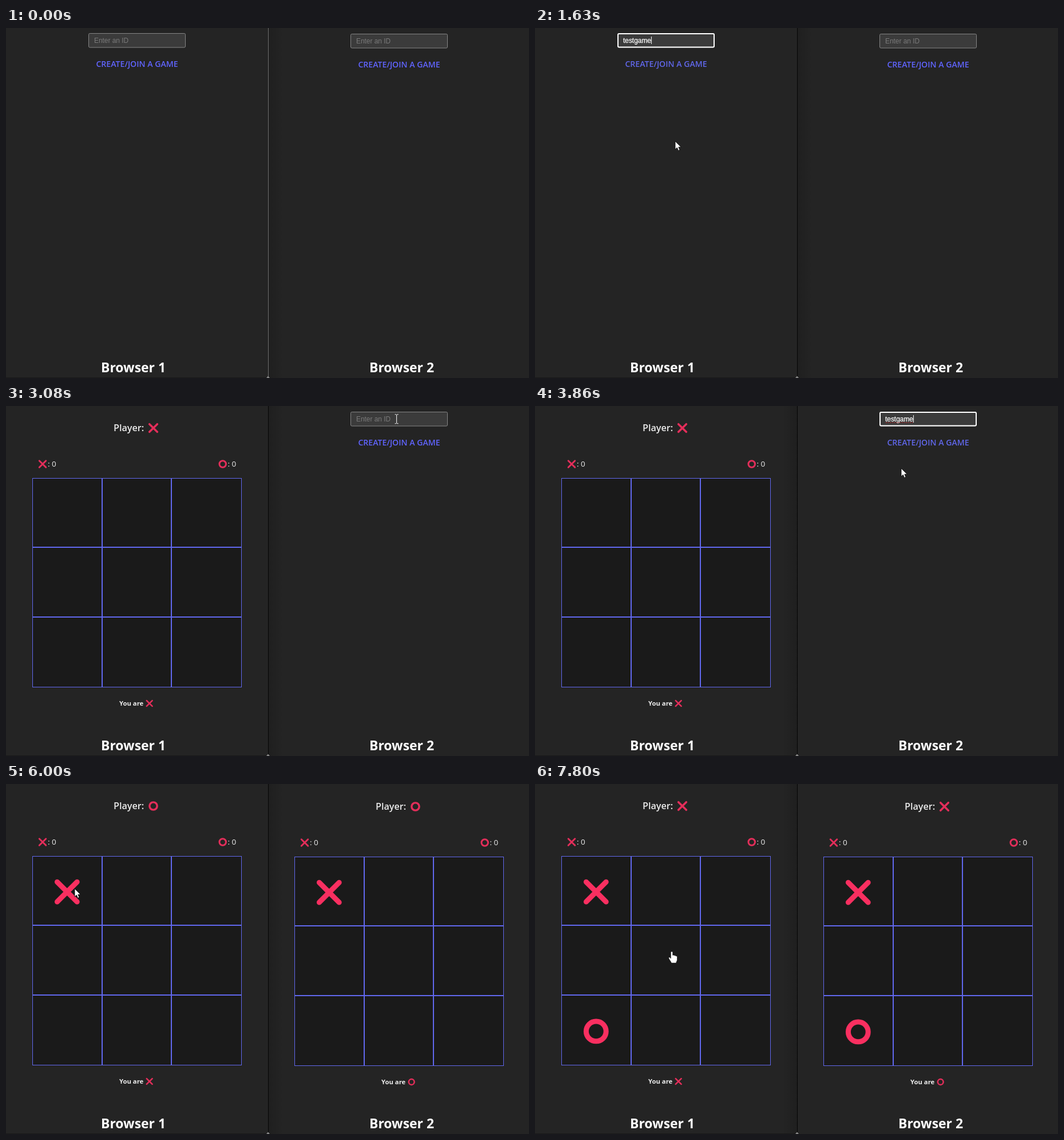
An HTML page for the animation above (8000 ms loop, 914x612 px).

```html
<!DOCTYPE html>
<html lang="en">
<head>
<meta charset="utf-8">
<title>Two browsers, one game</title>
<style>
  html, body { margin: 0; width: 100%; height: 100%; overflow: hidden; background: #242424; }
  svg { display: block; width: 914px; height: 612px; }
  text { font-family: "Open Sans", "Noto Sans", sans-serif; fill: #ececec; white-space: pre; }
  .field { font: 11.9px "Liberation Sans", Arial, sans-serif; fill: #7b7b7b; }
  .field.typed { fill: #fff; stroke: #fff; stroke-width: .25px; }
  .link { font-size: 14.1px; font-weight: 600; text-anchor: middle; }
  .player { font-size: 16.2px; font-weight: 600; }
  .score { font-size: 13.5px; }
  .you { font-size: 11.3px; font-weight: 700; }
  .title { font-size: 22.9px; font-weight: 700; text-anchor: middle; fill: #fff; }
  .small { color: #e32e5a; }
  .big { color: #f92f60; }
</style>
</head>
<body>
<svg id="stage" viewBox="0 0 914 612">
  <defs>
    <g id="X"><path d="M-17.4-17.4 17.4 17.4M17.4-17.4-17.4 17.4" fill="none" stroke="currentColor" stroke-width="9" stroke-linecap="round"/></g>
    <g id="O"><circle r="17.4" fill="none" stroke="currentColor" stroke-width="9"/></g>
    <linearGradient id="shade">
      <stop offset="0" stop-color="#000" stop-opacity=".14"/>
      <stop offset="1" stop-color="#000" stop-opacity="0"/>
    </linearGradient>
  </defs>
  <rect width="914" height="612" fill="#242424"/>
  <rect id="shadow" width="26" height="612" fill="url(#shade)"/>
  <path d="M0 611.5H456" stroke="#191919"/>
  <g id="panels"></g>
  <path id="divider" d="M458.5 0V612"/>
  <path d="M455 612 458 608.5 461 612Z" fill="#8a8a8a"/>
  <text class="title" x="222.5" y="602">Browser 1</text>
  <text class="title" x="691.5" y="602">Browser 2</text>
  <g id="pointer">
    <path id="arrow" d="M0 0V14.3L3.3 11.2 5.5 16.4 8 15.3 5.8 10.3H10.2Z" fill="#fff" stroke="#000" stroke-width=".8"/>
    <path id="hand" d="M-1.7 1.5C-1.7-.5 1.7-.5 1.7 1.5V6.5C2.5 5.6 4.2 5.8 4.5 7.1 5.4 6.3 6.9 6.7 7.1 8 8.1 7.4 9.5 8 9.5 9.5V14C9.5 16.5 8 17.5 7.7 20H-.6C-1.2 17.5-4.7 14-5.3 11.5-5.6 9.8-3.5 9.3-2.6 10.8L-1.7 12Z" fill="#fff" stroke="#000" stroke-width=".6"/>
    <path id="beam" d="M-3-8H-1L0-7 1-8H3M0-7V7M-3 8H-1L0 7 1 8H3" fill="none" stroke="#fff"/>
  </g>
</svg>
<script>
const LOOP = 8000, WORD = "testgame";
const $ = id => document.getElementById(id);
const show = (el, on) => el.setAttribute("visibility", on ? "inherit" : "hidden");

const sides = [
  { dx: 0, dy: 0, mark: "X", focus: 640, blur: 2380, hover: 2150, join: 2590,
    keys: [900, 1000, 1090, 1350, 1400, 1460, 1530, 1600], spell: false },
  { dx: 458, dy: 1, mark: "O", focus: 3230, blur: 4400, hover: 4250, join: 4540,
    keys: [...WORD].map((_, i) => 3300 + i * 70), spell: true }
];
const moves = [
  { at: 5650, mark: "X", col: 0, row: 0 },
  { at: 7040, mark: "O", col: 0, row: 2 }
];
// time, x, y of the pointer
const path = [
  [70, 805, 600], [560, 230, 22], [640, 230, 22], [820, 245, 198],
  [1700, 245, 198], [2110, 213, 73], [2180, 213, 71], [2590, 213, 71],
  [3120, 690, 22], [3230, 690, 22], [3440, 640, 109], [4000, 640, 109],
  [4280, 680, 66], [4540, 680, 66], [4890, 615, 130], [5030, 236, 262],
  [5450, 120, 183], [6050, 120, 183], [6360, 790, 400], [6500, 745, 432],
  [6640, 594, 430], [7100, 594, 430], [7700, 239, 293], [LOOP, 239, 293]
];

const mark = (kind, x, y, half, cls = "small") =>
  `<use href="#${kind}" class="${cls}" transform="translate(${x} ${y}) scale(${half / 22})"/>`;

function build(side) {
  const g = document.createElementNS("http://www.w3.org/2000/svg", "g");
  g.setAttribute("transform", `translate(${side.dx} ${side.dy})`);
  g.innerHTML = `
    <g class="lobby">
      <rect x="144.5" y="9.5" width="169" height="24.5" rx="2" fill="#3b3b3b" stroke="#858585"/>
      <rect class="ring" x="145" y="10" width="168" height="23.5" rx="2" fill="none" stroke="#fff" stroke-width="2"/>
      <text class="field" x="154" y="25.5"></text>
      <path class="caret" stroke="#fff"/>
      <path class="squiggle" d="M155 28H203" stroke="#d03030" stroke-dasharray="2 1.5"/>
      <text class="link" x="229" y="67.5">CREATE/JOIN A GAME</text>
    </g>
    <g class="game">
      <text class="player" x="188" y="44">Player:</text>
      <g class="turnX">${mark("X", 257.5, 38.5, 8.6)}</g>
      <g class="turnO">${mark("O", 257.5, 38.5, 8.4)}</g>
      ${mark("X", 64, 101.5, 7.3)}<text class="score" x="73" y="106">: 0</text>
      ${mark("O", 378.7, 101.5, 7.3)}<text class="score" x="387.5" y="106">: 0</text>
      <rect x="46.5" y="126.5" width="365" height="365" fill="#1a1a1a" stroke="#6168ee"/>
      <path d="M168 126V492M289 126V492M46 247H412M46 369H412" stroke="#6168ee" stroke-width="2"/>
      ${moves.map(m => `<g class="move">${mark(m.mark, 106.8 + m.col * 121.8, 188.6 + m.row * 121.9, 22, "big")}</g>`).join("")}
      <text class="you" x="198" y="524">You are</text>
      ${mark(side.mark, 250.7, 520, 6.2)}
    </g>`;
  $("panels").append(g);
  for (const name of ["lobby", "game", "ring", "field", "caret", "squiggle", "link", "turnX", "turnO"])
    side[name] = g.querySelector("." + name);
  side.moves = [...g.querySelectorAll(".move")];
}
sides.forEach(build);

const turnAt = t => moves.filter(m => t >= m.at).length % 2 ? "O" : "X";

function drawSide(s, t) {
  const joined = t >= s.join;
  show(s.lobby, !joined);
  show(s.game, joined);

  const typed = WORD.slice(0, s.keys.filter(k => t >= k).length);
  const focused = !joined && t >= s.focus && t < s.blur;
  s.field.textContent = typed || "Enter an ID";
  s.field.classList.toggle("typed", typed !== "");
  show(s.ring, focused);
  const end = 154.5 + (typed ? s.field.getComputedTextLength() : 0);
  s.caret.setAttribute("d", `M${end} 15V28`);
  const lastKey = Math.max(s.focus, ...s.keys.filter(k => t >= k));
  show(s.caret, focused && (t - lastKey) % 1060 < 530);
  show(s.squiggle, s.spell && focused && typed === WORD);
  s.link.style.fill = t >= s.hover ? "#535bf2" : typed ? "#6067ea" : "#6064ff";

  const turn = turnAt(t);
  show(s.turnX, joined && turn === "X");
  show(s.turnO, joined && turn === "O");
  s.moves.forEach((el, i) => show(el, joined && t >= moves[i].at));
}

function pointerAt(t) {
  const i = Math.max(1, path.findIndex(p => p[0] > t));
  const [t0, x0, y0] = path[i - 1], [t1, x1, y1] = path[i];
  const u = Math.max(0, (t - t0) / (t1 - t0)), e = u * u * (3 - 2 * u);
  return [x0 + (x1 - x0) * e, y0 + (y1 - y0) * e];
}

function shapeAt(x, y, t) {
  const s = sides[x > 458 ? 1 : 0], px = x - s.dx, py = y - s.dy;
  const within = (l, r, top, bottom) => px > l && px < r && py > top && py < bottom;
  if (t < s.join) {
    if (within(144, 314, 9, 34)) return "beam";
    return within(144, 314, 48, 80) ? "hand" : "arrow";
  }
  if (!within(46, 412, 126, 492) || turnAt(t) !== s.mark) return "arrow";
  const col = Math.floor((px - 46) / 122), row = Math.floor((py - 126) / 122);
  return moves.some(m => t >= m.at && m.col === col && m.row === row) ? "arrow" : "hand";
}

function draw(t) {
  sides.forEach(s => drawSide(s, t));

  const rightActive = t >= 3230 && t < 5650 || t >= 7040;
  $("shadow").setAttribute("transform", rightActive ? "translate(458 0) scale(-1 1)" : "translate(459 0)");
  $("divider").setAttribute("stroke", t < 640 ? "#6c6c6c" : "#050505");

  const [x, y] = pointerAt(t), shape = shapeAt(x, y, t);
  $("pointer").setAttribute("transform", `translate(${x} ${y})`);
  for (const id of ["arrow", "hand", "beam"]) show($(id), t >= 70 && id === shape);
}

const start = performance.now();
function tick() {
  draw((performance.now() - start) % LOOP);
  requestAnimationFrame(tick);
}
tick();
</script>
</body>
</html>
```
